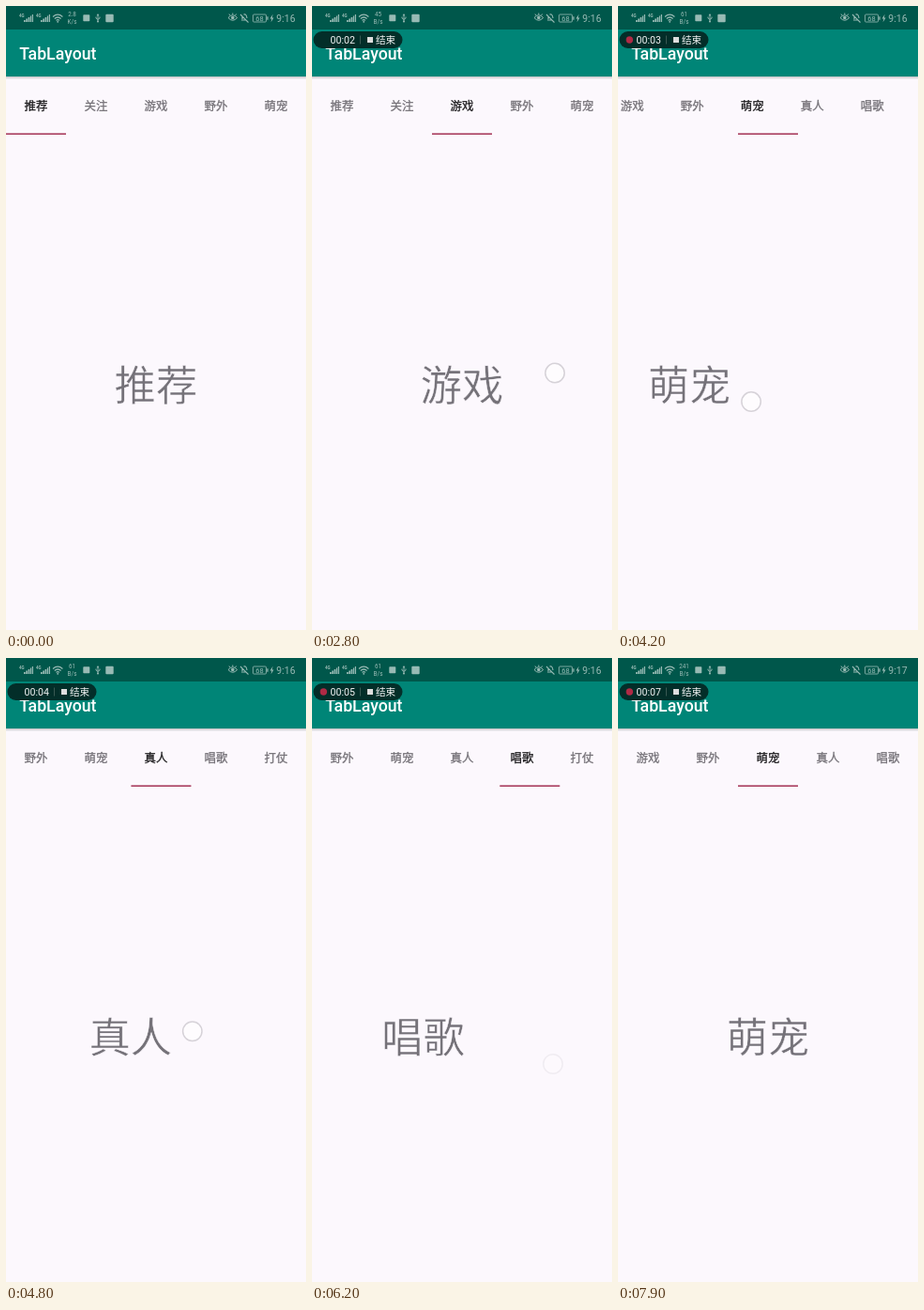
Animation of 320x664 px, one loop 8 s. Source, as an HTML page:

```html
<!DOCTYPE html>
<html lang="zh-CN">
<head>
<meta charset="utf-8">
<title>TabLayout</title>
<style>
  html, body { margin: 0; width: 100%; height: 100%; overflow: hidden; background: #fcf8fd; }
  svg { display: block; width: 100vw; height: 100vh; font-family: Roboto, "Noto Sans CJK SC", "Noto Sans CJK", sans-serif; }
  .mid { text-anchor: middle; }
  /* Thin strokes stand in for medium and demi-light weights. */
  #tabs text { font-size: 12.45px; fill: #747177; stroke: #747177; stroke-width: .3; }
  #tabs .on { fill: #1d1c1e; stroke: #1d1c1e; }
  #pages text { font-size: 44.4px; fill: #757279; stroke: #fcf8fd; stroke-width: .5; }
  #status { fill: #98bab4; }
  .line { fill: none; stroke: #98bab4; }
</style>
</head>
<body>
<svg viewBox="0 0 320 664">
  <defs>
    <linearGradient id="shade" x2="0" y2="1">
      <stop stop-color="#000" stop-opacity=".22"/>
      <stop offset="1" stop-color="#000" stop-opacity="0"/>
    </linearGradient>
    <g id="signal">
      <text y="11.8" font-size="4.5" font-weight="700">4G</text>
      <path d="M5 17v-2h1.7v2zM7.3 17v-3.5H9V17zM9.6 17v-5h1.7v5zM11.9 17v-6.5h1.2V17zM13.8 17V9H15v8z"/>
    </g>
  </defs>
  <rect width="320" height="664" fill="#fcf8fd"/>
  <g id="pages"></g>
  <g id="tabs"><rect id="bar" y="135.3" width="64" height="1.7" fill="#ae4868"/></g>

  <rect y="75" width="320" height="3.2" fill="url(#shade)"/>
  <rect y="25" width="320" height="50" fill="#008577"/>
  <rect width="320" height="25" fill="#00574b"/>
  <text x="14.3" y="57" font-size="17.7" font-weight="500" fill="#fff">TabLayout</text>

  <g id="status">
    <use href="#signal" x="14"/>
    <use href="#signal" x="32"/>
    <g class="line" stroke-width="1.2">
      <path d="M50 11.5q5.2-4.6 10.4 0M51.8 13.5q3.4-3 6.8 0M53.5 15.4q1.7-1.5 3.4 0"/>
      <path d="M98 9.500v7M96 11.500v1.500l2 1.400 2-1.400v-1.500" stroke-width=".9"/>
      <path d="M237 12.5q4.8-5.5 9.6 0q-4.8 5.5-9.6 0zM238 8.5l1 1.5M241.8 7.5v1.7M245.6 8.5l-1 1.5" stroke-width="1"/>
      <path d="M250 9l8.5 8.5M251 15h5M252 14v-3M253.5 9q3-1 3.5 4" stroke-width="1.1"/>
      <rect x="263.5" y="9" width="14" height="8" rx="1" stroke-width=".8"/>
    </g>
    <circle cx="55.2" cy="16.8" r=".9"/>
    <g class="mid" font-size="6.3">
      <text id="rate" x="70.5" y="11.3"></text>
      <text id="unit" x="70.5" y="19"></text>
    </g>
    <rect x="82.3" y="9.3" width="7" height="7" rx=".8"/>
    <path d="M98 8l1.4 2.2h-2.8z"/>
    <circle cx="98" cy="16.4" r="1"/>
    <rect x="106.3" y="8.8" width="8.4" height="8.4" rx="1"/>
    <circle cx="241.8" cy="12.5" r="1.8"/>
    <text class="mid" x="270.5" y="15.8" font-size="7.5">68</text>
    <path d="M278.3 11.3h1.3v3.4h-1.3zM284.6 8.8l-3 4.8h1.8l-.8 3.7 3-4.9h-1.8z"/>
    <text id="clock" x="288.3" y="16.7" font-size="10.5"></text>
  </g>

  <g id="pill">
    <rect x="1.5" y="27" width="95" height="18" rx="9" fill="#032e29"/>
    <circle id="dot" cx="12.3" cy="36" r="3.7" fill="#b02a45"/>
    <path d="M51.5 31.5v9" stroke="#47655f" stroke-width=".8"/>
    <rect x="59" y="33" width="6" height="6" fill="#dedede"/>
    <g font-size="10.6" fill="#f4f4f4">
      <text id="timer" x="19.5" y="39.9"></text>
      <text x="68" y="40">结束</text>
    </g>
  </g>
  <circle id="touch" r="10.2" fill="#fff" fill-opacity=".5" stroke="#d6d2d8" stroke-width="1.5"/>
</svg>
<script>
const LOOP = 8000, STEP = 100, DRAG = 250, SETTLE = 400, REACH = 150, SLOP = 14;
const NAMES = ["推荐", "关注", "游戏", "野外", "萌宠", "真人", "唱歌", "打仗"];
const RATES = [["2.8", "K/s"], ["45", "B/s"], ["61", "B/s"], ["241", "B/s"]];
// press time, page direction, finger start x and y, finger end y
const SWIPES = [
  [1239, 1, 245.5, 399.6, 415], [1985, 1, 248, 400, 426], [2765, 1, 262, 390, 419],
  [3365, 1, 248, 396, 424], [3998, 1, 240, 408, 428], [4669, 1, 240, 389, 419],
  [5270, 1, 245, 395, 422], [5847, -1, 107, 420, 432], [6475, -1, 105, 425, 440],
  [7100, -1, 105, 422, 438]
];
const $ = id => document.getElementById(id);
const clamp = (v, lo, hi) => Math.min(hi, Math.max(lo, v));
const move = (id, x, y = 0) => $(id).setAttribute("transform", `translate(${x} ${y})`);

function label(parent, name, x, y) {
  const text = document.createElementNS("http://www.w3.org/2000/svg", "text");
  text.setAttribute("x", x);
  text.setAttribute("y", y);
  text.setAttribute("class", "mid");
  text.textContent = name;
  return $(parent).appendChild(text);
}
const tabs = NAMES.map((name, i) => {
  label("pages", name, 160 + 320 * i, 419.8);
  return label("tabs", name, 32 + 64 * i, 111.4);
});

// Share of a page turned, a given time after the finger goes down.
const pull = age => clamp(age / DRAG, 0, 1) ** 2;
function turned(age) {
  const dragged = Math.max(0, REACH * pull(age) - SLOP) / 320;
  const rest = (1 - clamp((age - DRAG) / SETTLE, 0, 1)) ** 5;
  return age < DRAG ? dragged : 1 - (1 - dragged) * rest;
}

function draw(t) {
  let page = 0, chosen = 0;
  $("touch").setAttribute("opacity", 0);
  for (const [start, dir, x, y, endY] of SWIPES) {
    const age = t - start;
    if (age < 0) break;
    page += dir * turned(age);
    if (age >= DRAG) chosen += dir;
    const e = pull(age);
    move("touch", x - dir * REACH * e, y + (endY - y) * e);
    $("touch").setAttribute("opacity", clamp(1 - (age - DRAG) / 150, 0, 1));
  }
  move("pages", -320 * page);
  move("tabs", -clamp(64 * page - 128, 0, 192));
  $("bar").setAttribute("x", 64 * page);
  tabs.forEach((tab, i) => tab.classList.toggle("on", i === chosen));

  const run = t - 350;
  $("pill").setAttribute("opacity", clamp((t - 100) / 200, 0, 1));
  $("dot").setAttribute("opacity", run >= 0 && run % 1000 >= 500 ? 1 : 0);
  $("timer").textContent = "00:0" + Math.max(0, Math.floor(run / 1000));
  [$("rate").textContent, $("unit").textContent] = RATES[Math.floor((t + 2400) / 3000)];
  $("clock").textContent = t < 7900 ? "9:16" : "9:17";
}

const began = performance.now();
function tick() {
  const t = (performance.now() - began) % LOOP;
  draw(Math.floor(t / STEP) * STEP);
  requestAnimationFrame(tick);
}
tick();
</script>
</body>
</html>
```
